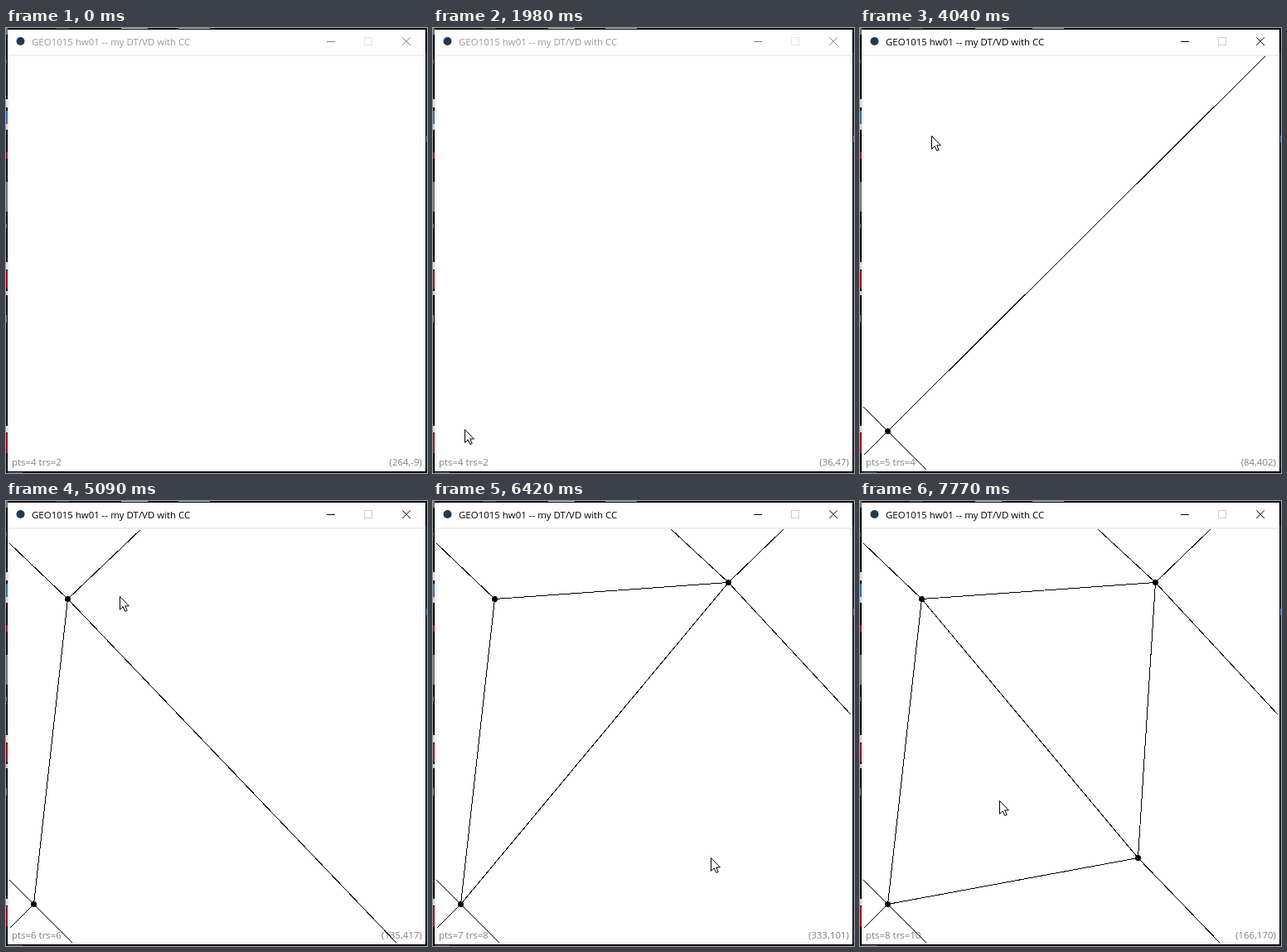
An HTML page that plays this animation: 508 px wide and 538 px high, repeating every 8000 ms.

```html
<!DOCTYPE html>
<html lang="en">
<head>
<meta charset="utf-8">
<title>Delaunay triangulation</title>
<style>
  html, body { margin: 0; width: 100%; height: 100%; overflow: hidden; background: #000; }
  svg { display: block; width: 508px; height: 538px; }
  text { font: 11.46px "Open Sans", "Noto Sans", sans-serif; white-space: pre; }
  .crisp { shape-rendering: crispEdges; }
  .chrome { fill: none; stroke: #808080; }
  .title { fill: #999; }
  .active .chrome { stroke: #000; }
  .active .title { fill: #000; }
  #maxBox { stroke: #e4e4e4; }
  .active #maxBox { stroke: #ccc; }
  .status { fill: #808080; }
</style>
</head>
<body>
<svg id="stage" viewBox="0 0 508 538">
  <rect width="508" height="538" fill="#050506"/>
  <g id="desktop" class="crisp"></g>
  <rect x="2" y="2" width="504" height="534" fill="#fff"/>
  <path class="crisp" d="M3 33H505V535H3Z" fill="none" stroke="#f0f0f0" stroke-width="2"/>
  <rect x="4" y="34" width="500" height="500" fill="#fefefe"/>

  <circle cx="17.5" cy="16" r="5" fill="#22384c"/>
  <text class="title" x="31" y="21">GEO1015 hw01 -- my DT/VD with CC</text>
  <path class="chrome crisp" d="M387 16.5H397"/>
  <rect id="maxBox" class="crisp" x="432.5" y="11.5" width="9" height="9" fill="none"/>
  <path class="chrome" d="M478.3 11.3L488 21M488 11.3L478.3 21"/>

  <clipPath id="canvas"><rect x="4" y="34" width="500" height="500"/></clipPath>
  <g clip-path="url(#canvas)">
    <text id="counts" class="status" x="7" y="529"></text>
    <text id="coords" class="status" x="502" y="529" text-anchor="end"></text>
    <path id="edges" class="crisp" transform="translate(.5 .5)" fill="none" stroke="#000"/>
    <g id="dots"></g>
  </g>
  <path id="cursor" d="M.5 .5V16.3L4.2 12.8L6.8 18.4L9.2 17.4L6.7 11.9H11.4Z" fill="#fff" stroke="#000"/>
  <circle id="press" r="12" fill="#ff0" fill-opacity=".5"/>
</svg>
<script>
const LOOP = 8000;
const $ = id => document.getElementById(id);

// Slivers of desktop visible around the window: x, y, w, h, colour
const slivers = [
  [0, 0, 2, 8, "#6c6f78"], [0, 38, 1, 5, "#555"], [0, 86, 2, 10, "#ddd"],
  [0, 100, 2, 16, "#3f74a8"], [0, 116, 2, 7, "#ccd9e4"], [0, 150, 2, 8, "#a01822"],
  [0, 186, 2, 36, "#76767a"], [0, 237, 1, 5, "#777"], [0, 283, 2, 9, "#ddd"],
  [0, 293, 2, 22, "#a01822"], [0, 318, 2, 5, "#ccc"], [0, 347, 1, 9, "#888"],
  [0, 481, 2, 8, "#ddd"], [0, 490, 2, 24, "#a01822"],
  [60, 0, 16, 1, "#55565c"], [139, 0, 32, 1, "#c9c9c9"], [208, 0, 38, 1, "#9ab0c4"],
  [506, 30, 2, 504, "#222326"], [507, 130, 1, 8, "#4079b5"],
  [2, 537, 18, 1, "#555"]
];
$("desktop").innerHTML = slivers.map(([x, y, w, h, c]) =>
  `<rect x="${x}" y="${y}" width="${w}" height="${h}" fill="${c}"/>`).join("");

// Pointer moves: first step, last step, number of steps, destination
const moves = [
  [70, 70, 1, 320, 465],
  [470, 710, 4, 210, 486],
  [940, 1180, 4, 104, 472],
  [1340, 1670, 5, 40, 484],
  [1980, 2150, 3, 33, 487],
  [3480, 3730, 4, 108, 148],
  [3980, 4040, 2, 86, 130],
  [4130, 4210, 2, 74, 118],
  [5090, 5090, 1, 137, 115],
  [5170, 5340, 3, 356, 98],
  [6190, 6350, 3, 331, 400],
  [6420, 6420, 1, 335, 431],
  [7360, 7770, 6, 168, 362]
];

const A = [33, 487], B = [74, 118], C = [356, 98], D = [335, 431];

// Clicks: press, release, insertion time, point
const clicks = [
  [2700, 2840, 2930, A],
  [4510, 4670, 4670, B],
  [5640, 5800, 5800, C],
  [6830, 6900, 6900, D]
];

// Triangulation after each insertion; outer edges end at the canvas border
const nearA = [[A, [4, 458]], [A, [4, 516]], [A, [80, 534]]];
const withC = [...nearA, [A, B], [B, [4, 51]], [B, C], [C, [287, 34]], [C, [422, 34]], [C, [504, 258]]];
const meshes = [
  [],
  [...nearA, [A, [488, 34]]],
  [...nearA, [A, B], [B, [4, 51]], [B, [162, 34]], [B, [471, 534]]],
  [...withC, [A, C]],
  [...withC, [A, D], [B, D], [C, D], [D, [434, 534]]]
];

function pointerAt(t) {
  let x = 320, y = 465;
  for (const [start, end, steps, tx, ty] of moves) {
    if (t < start) break;
    const done = t >= end ? steps : 1 + Math.floor((t - start) / (end - start) * (steps - 1) + 1e-6);
    x = Math.round(x + (tx - x) * done / steps);
    y = Math.round(y + (ty - y) * done / steps);
  }
  return [x, y];
}

let shown = -1;
function showMesh(n) {
  if (n === shown) return;
  shown = n;
  $("edges").setAttribute("d", meshes[n].map(([p, q]) => `M${p}L${q}`).join(""));
  $("dots").innerHTML = clicks.slice(0, n).map(c =>
    `<circle cx="${c[3][0] + .5}" cy="${c[3][1] + .5}" r="3.5"/>`).join("");
  $("counts").textContent = `pts=${n + 4} trs=${2 * n + 2}`;
}

function draw(t) {
  const [x, y] = pointerAt(t);
  $("cursor").setAttribute("transform", `translate(${x} ${y})`);
  $("cursor").style.display = t < 70 ? "none" : "";
  $("coords").textContent = t < 470 ? "(264,-9)" : `(${x - 2},${532 - y})`;
  $("stage").classList.toggle("active", t >= 2700);
  $("press").style.display = clicks.some(c => t >= c[0] && t < c[1]) ? "" : "none";
  $("press").setAttribute("transform", `translate(${x} ${y})`);
  showMesh(clicks.filter(c => t >= c[2]).length);
}

const begin = performance.now();
function tick() {
  draw((performance.now() - begin) % LOOP);
  requestAnimationFrame(tick);
}
tick();
</script>
</body>
</html>
```
